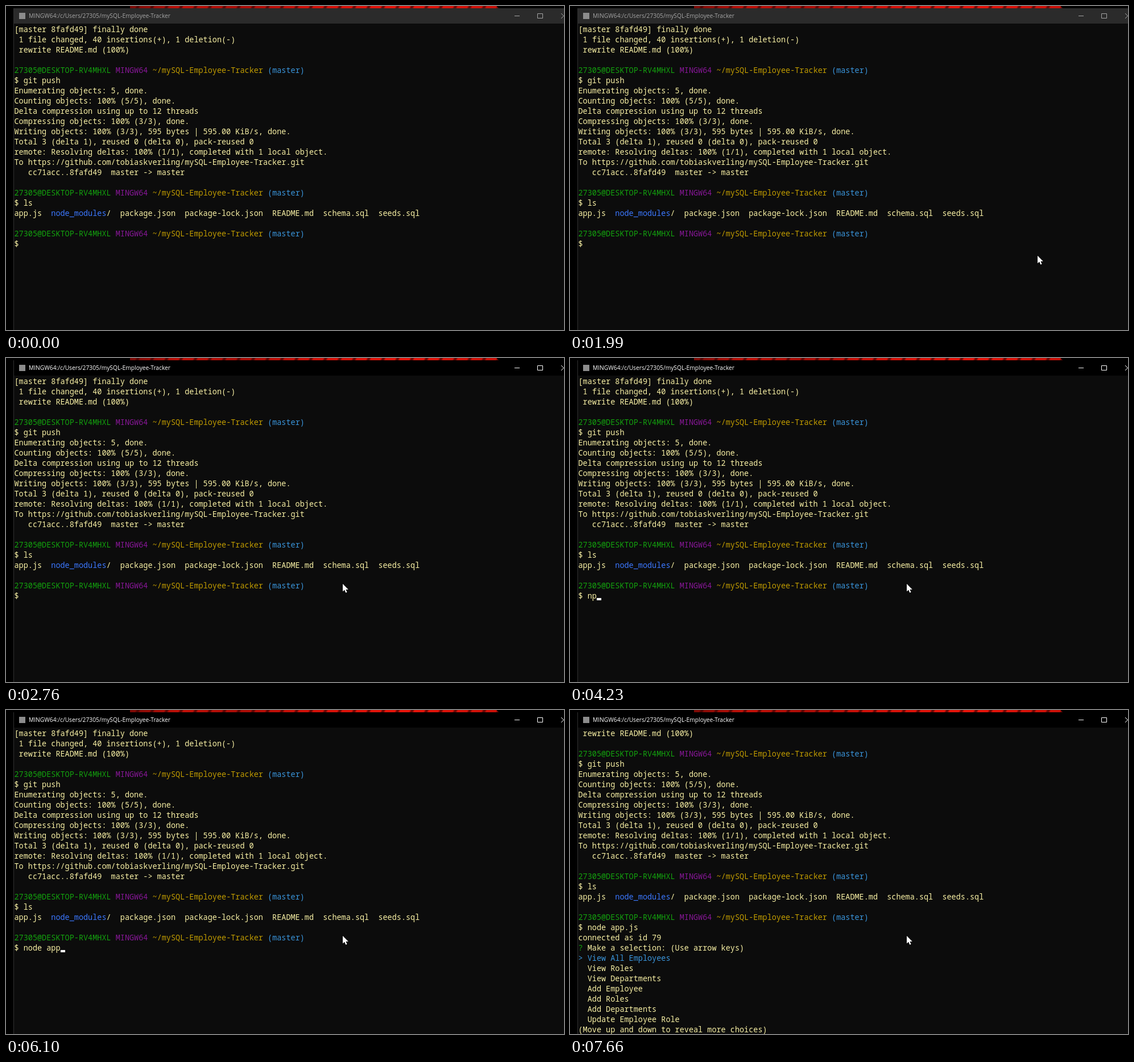
These frames come from a looping animation (981x571 px, 8 s). An HTML page:

```html
<!DOCTYPE html>
<html lang="en">
<head>
<meta charset="utf-8">
<title>Terminal session</title>
<style>
  html, body { margin: 0; width: 100%; height: 100%; overflow: hidden; background: #000; }
  #stage { position: relative; width: 981px; height: 571px; overflow: hidden; background: #000; }
  #stage > *, #bar > * { position: absolute; }

  #wallpaper {
    left: 218px; top: 0; width: 648px; height: 4px;
    clip-path: polygon(0 0, 99.4% 0, 100% 100%, 0 100%);
    background:
      repeating-linear-gradient(115deg, #3000 0 9px, #300a 12px 14px, #3000 17px 23px),
      linear-gradient(90deg, #7a0a06, #c21008 14%, #a80c06 30%, #d01008 48%, #e8140a 75%, #c81008);
  }
  #window { left: 13px; top: 4px; width: 968px; height: 567px; background: #0c0c0c; border-left: 1px solid #303030; box-sizing: border-box; }
  #bar { left: 14px; top: 4px; width: 967px; height: 27px; background: #2b2b2b; color: #a5a5a5; }
  #bar.active { background: #000; color: #fff; }
  #icon { left: 9px; top: 8px; width: 11px; height: 11px; background: #8c8c8c; }
  #title { left: 26px; top: 0; font: 10.25px/27px "Open Sans", "Noto Sans", sans-serif; white-space: pre; }
  #buttons { left: 876px; top: 0; fill: none; stroke: currentColor; }

  #view { left: 14px; top: 32px; width: 967px; height: 539px; overflow: hidden; }
  #log {
    position: absolute; left: .5px; top: 0; margin: 0;
    font: 13.5px/18px "Noto Sans Mono", "DejaVu Sans Mono", monospace;
    font-variant-ligatures: none; color: #f9f1a5;
  }
  #log div { height: 18px; white-space: pre; }
  .green { color: #13a10e; }
  .purple { color: #881798; }
  .gold { color: #c19c00; }
  .cyan { color: #3a96dd; }
  .blue { color: #3b78ff; }

  #caret { width: 8px; height: 4px; background: #fff; }
  #pointer { left: 0; top: 0; overflow: visible; }
  #halo { left: 807px; top: 425.5px; width: 27px; height: 27px; border-radius: 50%; background: #fffa007e; }
</style>
</head>
<body>
<div id="stage">
  <div id="wallpaper"></div>
  <div id="window"></div>
  <div id="bar">
    <div id="icon"></div>
    <div id="title">MINGW64:/c/Users/27305/mySQL-Employee-Tracker</div>
    <svg id="buttons" width="91" height="27">
      <path d="M4 13.5H13M44.5 9.5H53.5V17.5H44.5ZM86 9L95 18M86 18L95 9"/>
    </svg>
  </div>
  <div id="view"><div id="log"></div></div>
  <div id="caret"></div>
  <svg id="pointer" width="12" height="18">
    <path d="M0 0V13.6L3.2 10.7L5.3 15.8L7.6 14.8L5.5 9.9H9.9Z" fill="#fff" stroke="#000" stroke-width="1.2" paint-order="stroke"/>
  </svg>
  <div id="halo"></div>
</div>
<script>
const LOOP = 8000;
const $ = id => document.getElementById(id);
const tint = (name, text) => `<span class="${name}">${text}</span>`;

const prompt = [
  tint("green", "27305@DESKTOP-RV4MHXL"), tint("purple", "MINGW64"),
  tint("gold", "~/mySQL-Employee-Tracker"), tint("cyan", "(master)")
].join(" ");

const history = [
  "[master 8fafd49] finally done",
  " 1 file changed, 40 insertions(+), 1 deletion(-)",
  " rewrite README.md (100%)",
  "",
  prompt,
  "$ git push",
  "Enumerating objects: 5, done.",
  "Counting objects: 100% (5/5), done.",
  "Delta compression using up to 12 threads",
  "Compressing objects: 100% (3/3), done.",
  "Writing objects: 100% (3/3), 595 bytes | 595.00 KiB/s, done.",
  "Total 3 (delta 1), reused 0 (delta 0), pack-reused 0",
  "remote: Resolving deltas: 100% (1/1), completed with 1 local object.",
  "To https://github.com/tobiaskverling/mySQL-Employee-Tracker.git",
  "   cc71acc..8fafd49  master -&gt; master",
  "",
  prompt,
  "$ ls",
  `app.js  ${tint("blue", "node_modules")}/  package.json  package-lock.json  README.md  schema.sql  seeds.sql`,
  "",
  prompt
];

const menu = [
  "connected as id 79",
  tint("green", "?") + " Make a selection: (Use arrow keys)",
  tint("cyan", "&gt; View All Employees"),
  "  View Roles",
  "  View Departments",
  "  Add Employee",
  "  Add Roles",
  "  Add Departments",
  "  Update Employee Role",
  "(Move up and down to reveal more choices)"
];

// [time, typed command, caret visible]
const typing = [
  [0, "", 0], [2300, "", 1], [2760, "", 0], [3310, "", 1], [3840, "", 0],
  [3920, "n", 1], [4230, "np", 1], [4550, "n", 1], [4700, "", 1],
  [5160, "n", 1], [5330, "no", 1], [5480, "nod", 1], [5710, "node", 1],
  [5790, "node ", 1], [5860, "node a", 1], [6030, "node ap", 1],
  [6100, "node app", 1], [6330, "node app.", 1], [6650, "node app.j", 1],
  [6730, "node app.js", 1], [7510, "node app.js", 0]
];
const ENTER = 6880, OUTPUT = 7660, FOCUS = 2220, HALO_END = 2300;

// [time, x, y] of the pointer tip
const moves = [
  [0, -40, -40], [120, 771, 476], [200, 744, 440], [270, 728, 408], [350, 733, 397],
  [1910, 832, 434], [1990, 822, 440], [2370, 768, 430], [2450, 640, 406], [2530, 592, 398]
];

const at = (steps, t) => steps.findLast(s => s[0] <= t);
const show = (el, on) => { el.style.visibility = on ? "visible" : "hidden"; };

let shown = "";
function setLog(command, done) {
  const key = command + done;
  if (key === shown) return;
  shown = key;
  const lines = [...history, "$ " + command, ...(done ? menu : [])];
  // the view scrolls by two rows once the menu is printed
  $("log").innerHTML = lines.slice(done ? 2 : 0).map(l => `<div>${l}</div>`).join("");
}

function draw() {
  const t = performance.now() % LOOP;
  const [, command, caretOn] = at(typing, t);
  const [, x, y] = at(moves, t);
  const entered = t >= ENTER;

  setLog(command, t >= OUTPUT);
  $("bar").classList.toggle("active", t >= FOCUS);

  const col = entered ? 0 : 2 + command.length;
  $("caret").style.left = Math.round(14.5 + col * 8.1) + "px";
  $("caret").style.top = (entered ? 441 : 423) + "px";
  show($("caret"), caretOn);

  $("pointer").style.transform = `translate(${x}px, ${y}px)`;
  show($("halo"), t >= FOCUS && t < HALO_END);
  requestAnimationFrame(draw);
}
draw();
</script>
</body>
</html>
```
